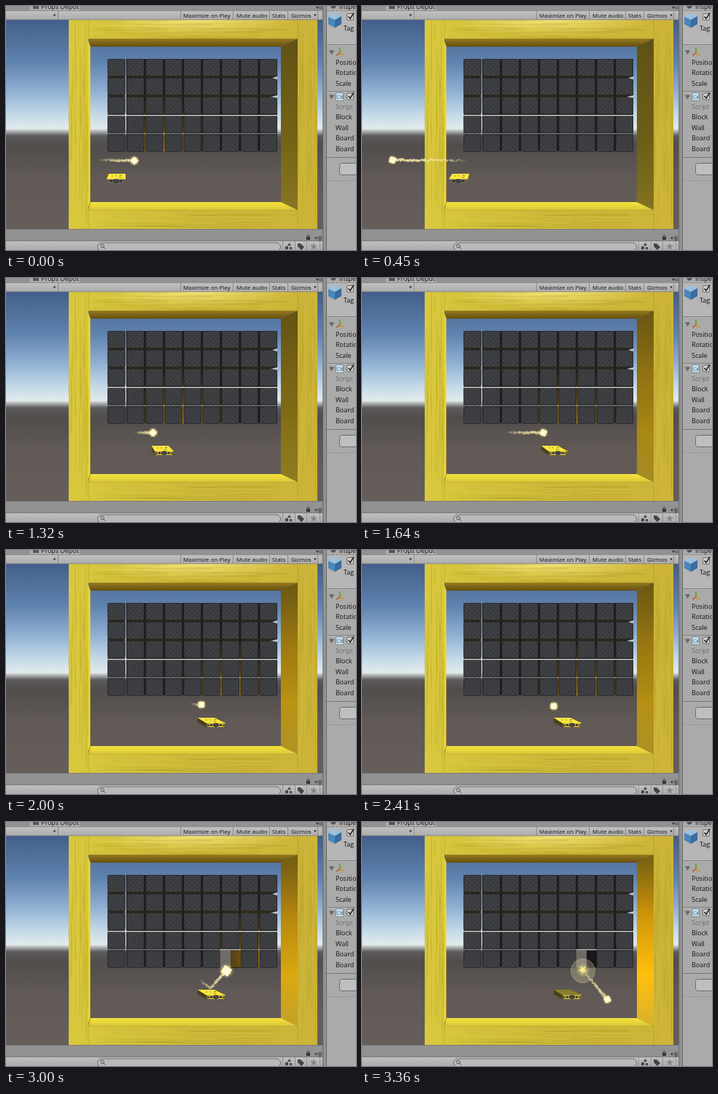
These frames come from a looping animation (480x336 px, 3.4 s). An HTML page:

```html
<!DOCTYPE html>
<html lang="en">
<head>
<meta charset="utf-8">
<title>Block breaker in the editor</title>
<style>
html,body{margin:0;width:100%;height:100%;overflow:hidden;background:#929292}
svg{display:block;width:480px;height:336px}
text{font-family:"Open Sans","Noto Sans",sans-serif;fill:#151515}
</style>
</head>
<body>
<svg id="stage" viewBox="0 0 480 336" xmlns="http://www.w3.org/2000/svg">
<defs>
  <linearGradient id="sky" x1="0" y1="19" x2="0" y2="307" gradientUnits="userSpaceOnUse">
    <stop offset="0" stop-color="#435f8a"/><stop offset=".2" stop-color="#5f82ae"/>
    <stop offset=".34" stop-color="#8fb0d2"/><stop offset=".45" stop-color="#c3d8e8"/>
    <stop offset=".52" stop-color="#e2eaec"/><stop offset=".555" stop-color="#5c5a5a"/>
    <stop offset=".6" stop-color="#514d4c"/><stop offset=".75" stop-color="#605955"/>
    <stop offset="1" stop-color="#665e5a"/>
  </linearGradient>
  <linearGradient id="bar" x1="0" y1="0" x2="0" y2="1">
    <stop offset="0" stop-color="#c2c2c2"/><stop offset="1" stop-color="#acacac"/>
  </linearGradient>
  <linearGradient id="wood" x1="86" y1="0" x2="427" y2="0" gradientUnits="userSpaceOnUse">
    <stop offset="0" stop-color="#d9c83d"/><stop offset=".5" stop-color="#d0bb3a"/><stop offset="1" stop-color="#cdb438"/>
  </linearGradient>
  <radialGradient id="sheen" gradientUnits="userSpaceOnUse" cx="0" cy="0" r="1" gradientTransform="translate(255 19) scale(140 22)">
    <stop offset="0" stop-color="#fff08a" stop-opacity=".75"/><stop offset="1" stop-color="#fff08a" stop-opacity="0"/>
  </radialGradient>
  <linearGradient id="under" x1="0" y1="45" x2="0" y2="56" gradientUnits="userSpaceOnUse">
    <stop offset="0" stop-color="#957a1c"/><stop offset="1" stop-color="#674f12"/>
  </linearGradient>
  <linearGradient id="ledge" x1="0" y1="270" x2="0" y2="281" gradientUnits="userSpaceOnUse">
    <stop offset="0" stop-color="#f7e43a"/><stop offset="1" stop-color="#d8c738"/>
  </linearGradient>
  <linearGradient id="side" x1="0" y1="45" x2="0" y2="281" gradientUnits="userSpaceOnUse">
    <stop offset="0" stop-color="#5f5116"/><stop offset=".6" stop-color="#6c5f17"/><stop offset="1" stop-color="#83731f"/>
  </linearGradient>
  <linearGradient id="lit" x1="0" y1="45" x2="0" y2="281" gradientUnits="userSpaceOnUse">
    <stop offset="0" stop-color="#a67a08" stop-opacity=".35"/><stop offset=".35" stop-color="#cf950a"/>
    <stop offset=".7" stop-color="#ffc00c"/><stop offset="1" stop-color="#d9b02c"/>
  </linearGradient>
  <radialGradient id="glow" gradientUnits="userSpaceOnUse" cx="0" cy="0" r="76">
    <stop offset="0" stop-color="#b07d0c"/><stop offset=".4" stop-color="#7d5a0c" stop-opacity=".8"/>
    <stop offset="1" stop-color="#5a400c" stop-opacity="0"/>
  </radialGradient>
  <radialGradient id="halo">
    <stop offset="0" stop-color="#fffbd0"/><stop offset=".45" stop-color="#fff3a0" stop-opacity=".75"/>
    <stop offset="1" stop-color="#ffe97a" stop-opacity="0"/>
  </radialGradient>
  <pattern id="dots" width="6.5" height="6.5" x="139.5" y="73" patternUnits="userSpaceOnUse">
    <rect width="6.5" height="6.5" fill="#3b3c40"/>
    <path d="M1.2 1.2h1v1h-1zM4.4 4.2h1v1h-1z" fill="#606165"/>
    <path d="M4.4 1h1v1h-1zM1.2 4.4h1v1h-1z" fill="#303135"/>
  </pattern>
  <clipPath id="view"><rect y="19" width="435" height="288"/></clipPath>
</defs>
<g id="scene" clip-path="url(#view)"></g>
<g id="chrome"></g>
</svg>
<script>
const LOOP = 3400, STEP = LOOP / 75, LIFE = 350, HIT = 2990;
const $ = id => document.getElementById(id);
const rect = (x, y, w, h, fill, more = '') =>
  `<rect x="${x}" y="${y}" width="${w}" height="${h}" fill="${fill}" ${more}/>`;
const path = (d, fill, more = '') => `<path d="${d}" fill="${fill}" ${more}/>`;
const label = (x, y, s, size = 9, more = '') => `<text x="${x}" y="${y}" font-size="${size}" ${more}>${s}</text>`;
const poly = pts => 'M' + pts.map(p => p.map(v => v.toFixed(2)).join(' ')).join('L') + 'Z';
const rnd = n => { const v = Math.sin(n * 127.1 + 3.7) * 43758.5453; return v - Math.floor(v); };
const clamp = (v, a = 0, b = 1) => Math.min(b, Math.max(a, v));

// [time, x, y]
const ballKeys = [[-350, 128, 212], [0, 176, 213], [500, 28, 212], [545, 27, 212], [860, 138, 212],
  [980, 179, 212.5], [1320, 202, 213], [1720, 262, 213], [1850, 268, 213], [2000, 268, 213],
  [2150, 263, 215], [2620, 263, 215], [2780, 280, 229], [3000, 303, 204], [3360, 337, 245], [3400, 341, 249.5]];
const padKeys = [[0, 151], [200, 132], [860, 132], [1320, 218], [1750, 288], [LOOP, 288]];
const spinKeys = [[0, 45], [860, -12], [1320, 45], [1850, 5], [2000, 0], [2620, 0], [3000, 35], [3360, -25], [LOOP, -30]];

function track(keys, t, c = 1) {
  let i = 1;
  while (i < keys.length - 1 && t > keys[i][0]) i++;
  const a = keys[i - 1], b = keys[i];
  return a[c] + (b[c] - a[c]) * clamp((t - a[0]) / (b[0] - a[0]));
}

function grain(x, y, w, h, seed, vertical) {
  let d = '';
  for (let i = 0; i < 36; i++) {
    const r = k => rnd(seed + i * 3 + k);
    const len = (vertical ? h : w) * (.1 + .3 * r(2));
    d += vertical ? `M${x + r(0) * w} ${y + r(1) * (h - len)}v${len}` : `M${x + r(1) * (w - len)} ${y + r(0) * h}h${len}`;
  }
  return `<path d="${d}" fill="none" stroke="#93801c" stroke-width=".8" opacity=".22"/>`;
}

const colX = i => 139.5 + 26.05 * i, rowY = j => 73 + 26 * j;

function blocks() {
  let s = rect(165, 73, 207, 127, '#1b1a19') + rect(139.5, 73, 24, 127, '#2a2928');
  for (let j = 1; j < 3; j++) s += rect(139.5, rowY(j) - 2.2, 232.5, 2.2, '#2d2515');
  s += rect(163.4, 73, 1.6, 127, 'url(#sky)');
  let gaps = '';
  for (let i = 2; i < 9; i++) gaps += `M${colX(i) - 2.4} 99h2.6v101h-2.6z`;
  for (let j = 1; j < 3; j++) gaps += `M165 ${rowY(j) - 2.2}h207v2.4h-207z`;
  s += path(gaps, 'url(#glow)');
  for (let j = 0; j < 5; j++) for (let i = 0; i < 9; i++) {
    const x = colX(i), y = rowY(j);
    s += rect(x + .3, y + .3, 23.4, 23.2, 'url(#dots)', 'rx="1.8" stroke="#28292d" stroke-width=".8"');
  }
  s += rect(139.5, 149.9, 232.5, 1.4, '#d6dad2') + rect(139.5, 175.3, 232.5, 1, '#a3a4a5');
  s += path('M365 99l7-2v4zM363 125l9-2v3.5z', '#b9cbdc');
  return s;
}

function buildScene() {
  let s = rect(0, 19, 435, 288, 'url(#sky)') + blocks();
  s += `<g id="hole">${rect(293.6, 176.6, 14.6, 24, '#706a69')}${rect(308, 176.6, 13.9, 24, '#17171b')}
    ${rect(308, 177, 13.9, 23, 'url(#glow)', 'opacity=".8"')}${rect(293.6, 175.2, 28, 1.2, '#c4c4c3')}</g>`;
  s += path('M113 45H400L377 56H116Z', 'url(#under)') + path('M112 45L115.5 56V270L112 281Z', '#f0d92c');
  s += path('M400 45L377 56V270L400 281Z', 'url(#side)');
  s += path('M400 45L377 56V270L400 281Z', 'url(#lit)', 'id="wallLight"');
  s += path('M113 281L116 270H377L400 281Z', 'url(#ledge)');
  s += path('M86 19H427V307H86ZM113 45V281H400V45Z', 'url(#wood)', 'fill-rule="evenodd"');
  s += path('M113 19H400V45H113Z', 'url(#sheen)');
  s += grain(86, 19, 27, 288, 1, true) + grain(400, 19, 27, 288, 120, true);
  s += grain(113, 19, 287, 26, 240) + grain(113, 281, 287, 26, 360);
  s += path('M113 19V45H400V19M113 307V281H400V307', 'none', 'stroke="#a18e22" stroke-width=".7" opacity=".6"');
  s += '<g id="paddle"></g><g id="trail"></g><g id="flash"></g><g id="ball"></g>';
  $('scene').innerHTML = s;
}

function buildChrome() {
  const line = (d, c = '#7a7a7a', w = 1) => path(d, 'none', `stroke="${c}" stroke-width="${w}"`);
  const fold = y => path(`M443 ${y}h7l-3.5 6z`, '#666');
  const check = y => rect(467.5, y, 9, 9, '#cdcdcd', 'rx="1.5" stroke="#6b6b6b"') +
    line(`M469.5 ${y + 4}l2.5 3 5-8`, '#222', 1.5);
  let s = rect(0, 0, 435, 6, '#929292') + rect(33, 0, 68, 6, '#acacac') + rect(37, 0, 8, 4, '#555');
  s += label(48, 3.6, 'Props Depot') + rect(0, 6, 435, 13, 'url(#bar)');
  s += line('M0 6.5H435M0 18.8H435', '#808080', .8);
  s += line([71.5, 239.5, 311.5, 361.5, 386.5, 427.5].map(x => `M${x} 7v12`).join(''), '#8a8a8a');
  s += path('M64.5 11.5h4l-2 2.8zM422 11.5h4l-2 2.8zM425 1h4l-2 3z', '#333') + line('M429 1.5h5M429 3.5h5', '#444', .8);
  [[243, 'Maximize on Play'], [316, 'Mute audio'], [365, 'Stats'], [391, 'Gizmos']]
    .forEach(([x, t]) => { s += label(x, 16, t, 8); });

  s += rect(0, 307, 435, 17, '#929292') + rect(0, 323, 435, 13, 'url(#bar)') + line('M0 307.5H435M0 323.5H435');
  s += rect(125.5, 326, 251, 11, '#b9b9b9', 'rx="5.5" stroke="#6c6c6c"');
  s += '<circle cx="132" cy="330.5" r="2.3" fill="none" stroke="#555"/>' + line('M134 332l2.5 2.5', '#555');
  s += path('M412 318h5v4h-5zM423 318.5h4l-2 3z', '#333') + line('M413 318v-1a1.5 1.5 0 0 1 3 0v1M428 318h5M428 320h5M428 322h5', '#333', .9);
  s += line('M379.5 324v12M396.5 324v12M412.5 324v12M430.5 324v12', '#929292');
  s += path('M383 335v-4h4v4zM386 330l2.5-4 2.5 4zM389 332h3v3h-3z', '#444');
  s += path('M400 327h4l5 5-4 4-5-5z', '#444') + path('M422 326l1.3 3.4 3.7.2-2.9 2.3 1 3.6-3.1-2-3.1 2 1-3.6-2.9-2.3 3.7-.2z', '#858585');

  s += rect(435, 0, 5, 336, '#929292') + rect(440, 0, 40, 336, '#aaa') + rect(440, 6, 40, 47, '#b6b6b6');
  s += line('M434.7 0V336M439.5 0V336', '#696969');
  s += '<circle cx="449" cy="0" r="3.5" fill="#555"/>' + label(457, 3.6, 'Inspector') + line('M440 6.5h40', '#969696');
  s += path('M442 15l9-5 9 4-9 5z', '#9cc1df') + path('M442 15l9 4v11l-9-5z', '#4a86ba') + path('M460 14l-9 5v11l9-5z', '#3a6d9f');
  s += check(10.5) + label(463, 34, 'Tag');
  s += line('M440 53.5h40M440 117.5h40M440 208.5h40', '#787878') + line('M440 54.5h40M440 118.5h40', '#bdbdbd');
  s += fold(61) + line('M458 65v-8', '#6a9a2e', 1.6) + line('M458 65l-5 3', '#b3603c', 1.6) + line('M458 65l6 3', '#c59a28', 1.6);
  [['Position', 81], ['Rotation', 95], ['Scale', 109.5], ['Block', 156], ['Wall', 170.5], ['Board Width', 185], ['Board Height', 199.5]]
    .forEach(([t, y]) => { s += label(452, y, t); });
  s += fold(122.5) + rect(452.5, 119.5, 10, 11, '#cfd9de', 'rx="1" stroke="#6e8796"') + label(453.5, 128, 'C#', 7, 'style="fill:#2577a4"') + check(120);
  s += label(452, 141.5, 'Script', 9, 'style="fill:#6c6c6c"');
  s += rect(457.5, 216.5, 40, 16, '#bfbfbf', 'rx="3" stroke="#6c6c6c"') + line('M440 240.5h40', '#9a9a9a');
  $('chrome').innerHTML = s;
}

function paddle(p, shine) {
  const back = x => 164 + (x - 164) * .89;
  const l = p - 13, r = p + 13, seen = clamp((p - 150) / 45, .1, 1);
  const q = (back(p) + p) / 2;
  let s = path(poly([[l, 237], [r, 237], [r, 244], [l, 244]]), '#b9a43a', `opacity="${seen}"`);
  s += path(poly([[back(l), 231], [l, 237], [l, 244], [back(l), 237.5]]), '#4a411d', `opacity="${seen}"`);
  s += path(poly([[back(l), 231], [back(r), 231], [r, 238], [l, 238]]), '#7a6c30');
  s += path(poly([[back(l), 231], [back(r), 231], [r, 238.4], [l, 238.4]]), '#fbe83f', `opacity="${shine}"`);
  s += path(`M${q - 7} 234h2M${q + 4} 233.5h3M${q - 1} 233v2M${q + 3} 236h4`, 'none', 'stroke="#7a6a26" stroke-width=".8"');
  s += `<ellipse cx="${p}" cy="241" rx="3.6" ry="2.2" fill="#4a4a52" stroke="#24252b"/>`;
  s += path(`M${p - 8} 241h3M${p + 5} 241h3`, 'none', 'stroke="#26272d" stroke-width="2"');
  s += path(`M${l} 239.5l3 2-3 2M${r} 239.5l-3 2 3 2`, 'none', `stroke="#2b2c34" stroke-width="1.2" opacity="${seen}"`);
  return s;
}

// Sparks are brighter where the ball was fast when it shed them.
function trail(t) {
  const gap = 6;
  let s = '';
  for (let k = Math.ceil((t - LIFE) / gap); k * gap <= t; k++) {
    const born = k * gap, age = (t - born) / LIFE;
    const x0 = track(ballKeys, born), y0 = track(ballKeys, born, 2);
    const speed = Math.hypot(x0 - track(ballKeys, born - gap), y0 - track(ballKeys, born - gap, 2)) / gap;
    const x = x0 + (rnd(k) - .5) * 2, y = y0 + (rnd(k + 500) - .5) * 2.4;
    const alpha = clamp(.1 + speed * 2.4, 0, .8) * (1 - age ** 3);
    s += `<circle cx="${x.toFixed(2)}" cy="${y.toFixed(2)}" r="${(1.9 - .7 * age).toFixed(2)}" fill="#efe3a2" opacity="${alpha.toFixed(2)}"/>`;
  }
  return s;
}

function star(x, y, r, n, turn) {
  const pts = [];
  for (let i = 0; i < n * 2; i++) {
    const a = i * Math.PI / n + turn, d = i % 2 ? r * .45 : r;
    pts.push([x + d * Math.cos(a), y + d * Math.sin(a)]);
  }
  return poly(pts);
}

function flash(t) {
  const age = t - HIT;
  if (age < 0) return '';
  const r = 5 + 11.5 * clamp(age / 250) ** .6;
  return `<circle cx="303" cy="205" r="${r}" fill="#e8dfae" fill-opacity=".28" stroke="#d8d0a4" stroke-opacity=".35"/>
    <circle cx="303" cy="204" r="${r * .6}" fill="url(#halo)" opacity=".55"/>` + path(star(302.5, 203.5, 6, 5, .4), '#ffed85');
}

function ball(t, x, y) {
  const burst = clamp(1 - Math.abs(t - 3010) / 110);
  const flare = .65 + .35 * Math.cos(t / 210);
  const spin = track(spinKeys, t), h = 4 + burst * 2;
  return `<circle cx="${x}" cy="${y}" r="${7.5 + burst * 4}" fill="url(#halo)" opacity="${.4 + .3 * flare}"/>` +
    path(star(x, y, 4.5 + 2.5 * flare + 3 * burst, 8, t / 300), '#fff0a0', 'opacity=".6"') +
    rect(x - h, y - h, h * 2, h * 2, '#fffbd8', `rx="1.2" stroke="#f4e38a" stroke-width=".8" transform="rotate(${spin} ${x} ${y})"`);
}

function draw(t) {
  const x = track(ballKeys, t), y = track(ballKeys, t, 2);
  const glow = $('glow'), low = clamp((y - 229) / 14);
  glow.setAttribute('cx', x + 38);
  glow.setAttribute('cy', y - 16);
  glow.setAttribute('r', 76 - 54 * low);
  $('hole').style.display = t >= HIT ? '' : 'none';
  $('wallLight').setAttribute('opacity', clamp((x - 150) / 185) ** 1.5);
  $('paddle').innerHTML = paddle(track(padKeys, t), 1 - .85 * low);
  $('trail').innerHTML = trail(t);
  $('flash').innerHTML = flash(t);
  $('ball').innerHTML = ball(t, x, y);
}

buildScene();
buildChrome();
const start = performance.now();
function tick(now) {
  const t = Math.max(0, now - start) % LOOP;
  draw(Math.floor((t + 3) / STEP) % 75 * STEP);
  requestAnimationFrame(tick);
}
draw(0);
requestAnimationFrame(tick);
</script>
</body>
</html>
```
